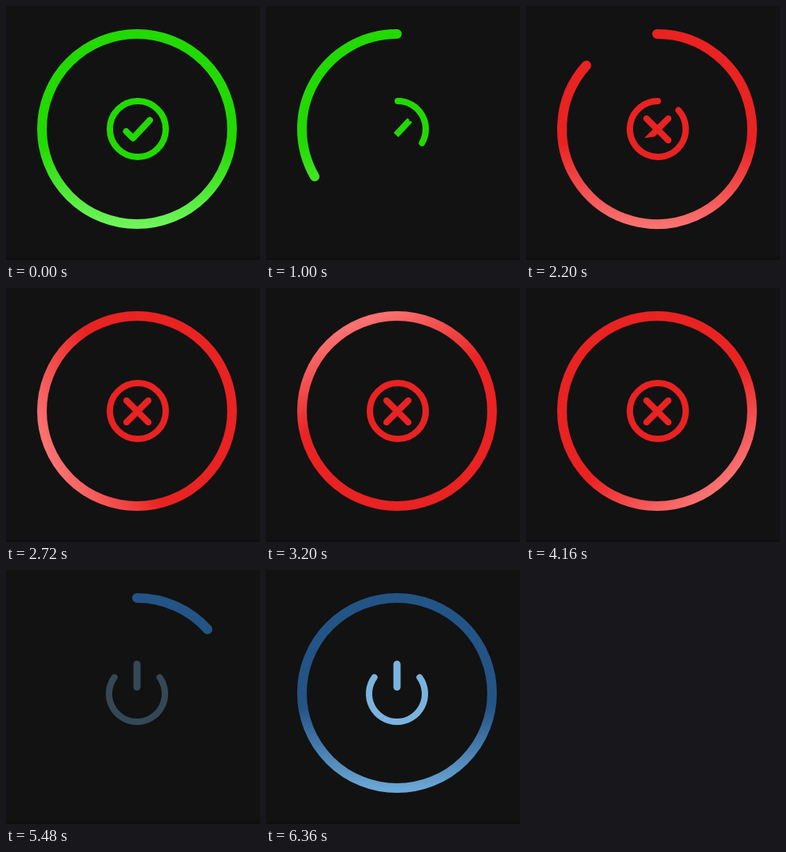
Animation, 318 px wide and 318 px high, one loop 7000 ms. Source, as an HTML page:

```html
<!DOCTYPE html>
<html>
<head>
<meta charset="utf-8">
<style>
  html, body { margin: 0; width: 100%; height: 100%; overflow: hidden; background: #121212; }
  svg { display: block; width: 100vw; height: 100vh; }
  .line { fill: none; stroke-linecap: round; stroke-linejoin: round; }
</style>
</head>
<body>
<svg viewBox="0 0 318 318">
  <defs id="defs"></defs>
  <rect width="318" height="318" fill="#121212"/>
  <rect y="315" width="318" height="3" fill="#110e0f"/>
  <path id="ring" class="line" stroke-width="12"/>
  <path id="badge" class="line" stroke-width="8"/>
  <path id="check" class="line" stroke="#22d900" stroke-width="8" d="M150.5 157L159 165.5L180 143"/>
  <path id="notch" class="line" stroke="#121212" stroke-width="1.5" d="M183.5 139.5L180 143.5"/>
  <path id="cross" fill="#e92222"/>
  <g id="power" class="line" stroke="#7bb3e0">
    <path id="powerArc" stroke-width="8"/>
    <path stroke-width="9" d="M164 118V146.5"/>
  </g>
</svg>
<script>
const LOOP = 7000, STEP = 40, FPS = 30;
const $ = id => document.getElementById(id);
const COLORS = {
  green: ['#22d900', '#70f45c'],
  red: ['#e92222', '#fb7272'],
  blue: ['#235486', '#6ca7d6']
};

$('defs').innerHTML = Object.entries(COLORS).map(([name, [base, glow]]) =>
  `<linearGradient id="${name}" gradientUnits="userSpaceOnUse" x1="0" y1="172" x2="0" y2="275">
    <stop offset="0" stop-color="${base}"/><stop offset="1" stop-color="${glow}"/>
  </linearGradient>`).join('');

const clamp = x => Math.max(0, Math.min(1, x));
const show = (el, on) => el.setAttribute('display', on ? 'inline' : 'none');

// Angles are in degrees, clockwise from the top.
function arc(cx, cy, r, from, to) {
  const at = deg => {
    const a = deg * Math.PI / 180;
    return `${(cx + r * Math.sin(a)).toFixed(2)} ${(cy - r * Math.cos(a)).toFixed(2)}`;
  };
  const seg = deg => `A${r} ${r} 0 0 1 ${at(deg)}`;
  return `M${at(from)}${seg((from + to) / 2)}${seg(to)}`;
}

// Closed outline of a cross with rounded arms, starting on the lower left tip.
function crossOutline(cx, cy, reach, half) {
  const points = [];
  for (let arm = 0; arm < 4; arm++) {
    const a = (135 + 90 * arm) * Math.PI / 180;
    const add = (u, v) => points.push([
      cx + u * Math.cos(a) - v * Math.sin(a),
      cy + u * Math.sin(a) + v * Math.cos(a)
    ]);
    add(half, -half);
    for (let i = 0; i <= 10; i++) {
      const b = (i / 10 - 0.5) * Math.PI;
      add(reach + half * Math.cos(b), half * Math.sin(b));
    }
  }
  const start = 11;
  return 'M' + points.slice(start).concat(points.slice(0, start)).join('L') + 'Z';
}

const outline = document.createElementNS('http://www.w3.org/2000/svg', 'path');
outline.setAttribute('d', crossOutline(164.5, 154.5, 19.3, 4));
const outlineLength = outline.getTotalLength();

function trimOutline(from, to) {
  if (from === 0 && to === 1) return outline.getAttribute('d');
  const points = [];
  for (let i = 0; i <= 160; i++) {
    const p = outline.getPointAtLength(outlineLength * (from + (to - from) * i / 160));
    points.push(p.x.toFixed(2) + ' ' + p.y.toFixed(2));
  }
  return 'M' + points.join('L') + 'Z';
}

function drawRings(color, from, to, withBadge) {
  const visible = to - from > 0.001;
  show($('ring'), visible);
  show($('badge'), visible && withBadge);
  $('ring').setAttribute('stroke', `url(#${color})`);
  $('ring').setAttribute('d', arc(164, 154, 119, 360 * from, 360 * to));
  $('badge').setAttribute('stroke', COLORS[color][0]);
  $('badge').setAttribute('d', arc(165, 154, 35, 360 * (1 - to), 360 * (1 - from)));
}

function drawCheck(gone) {
  const el = $('check'), length = el.getTotalLength();
  show(el, gone < 1);
  show($('notch'), gone > 0 && gone < 1);
  const skip = length * Math.pow(gone, 2.2);
  el.style.strokeLinecap = gone > 0 ? 'butt' : 'round';
  el.setAttribute('stroke-dasharray', gone > 0 ? `0 ${skip} ${length} ${length}` : 'none');
}

$('powerArc').setAttribute('d', arc(164, 155, 35, 54, 306));

function render(ms) {
  const sampled = Math.floor(ms / STEP) * STEP;
  const frame = Math.floor(sampled * FPS / 1000 + 1e-6);
  const span = (start, end) => clamp((frame - start) / (end - start));
  const isGreen = frame < 40, isBlue = frame >= 160;
  const isRed = !isGreen && !isBlue;

  if (isGreen) drawRings('green', span(10, 40), 1, true);
  else if (isRed) drawRings('red', span(130, 160), span(40, 70), true);
  else drawRings('blue', 0, span(160, 190), false);

  drawCheck(span(10, 40));
  show($('cross'), isRed && frame > 40);
  if (isRed) $('cross').setAttribute('d', trimOutline(span(130, 160), span(40, 70)));
  $('red').setAttribute('gradientTransform', `rotate(${360 * span(70, 130)} 164 154)`);
  show($('power'), isBlue);
  $('power').setAttribute('opacity', span(160, 172));
}

const origin = performance.now();
function tick() {
  render((performance.now() - origin) % LOOP);
  requestAnimationFrame(tick);
}
tick();
</script>
</body>
</html>
```
